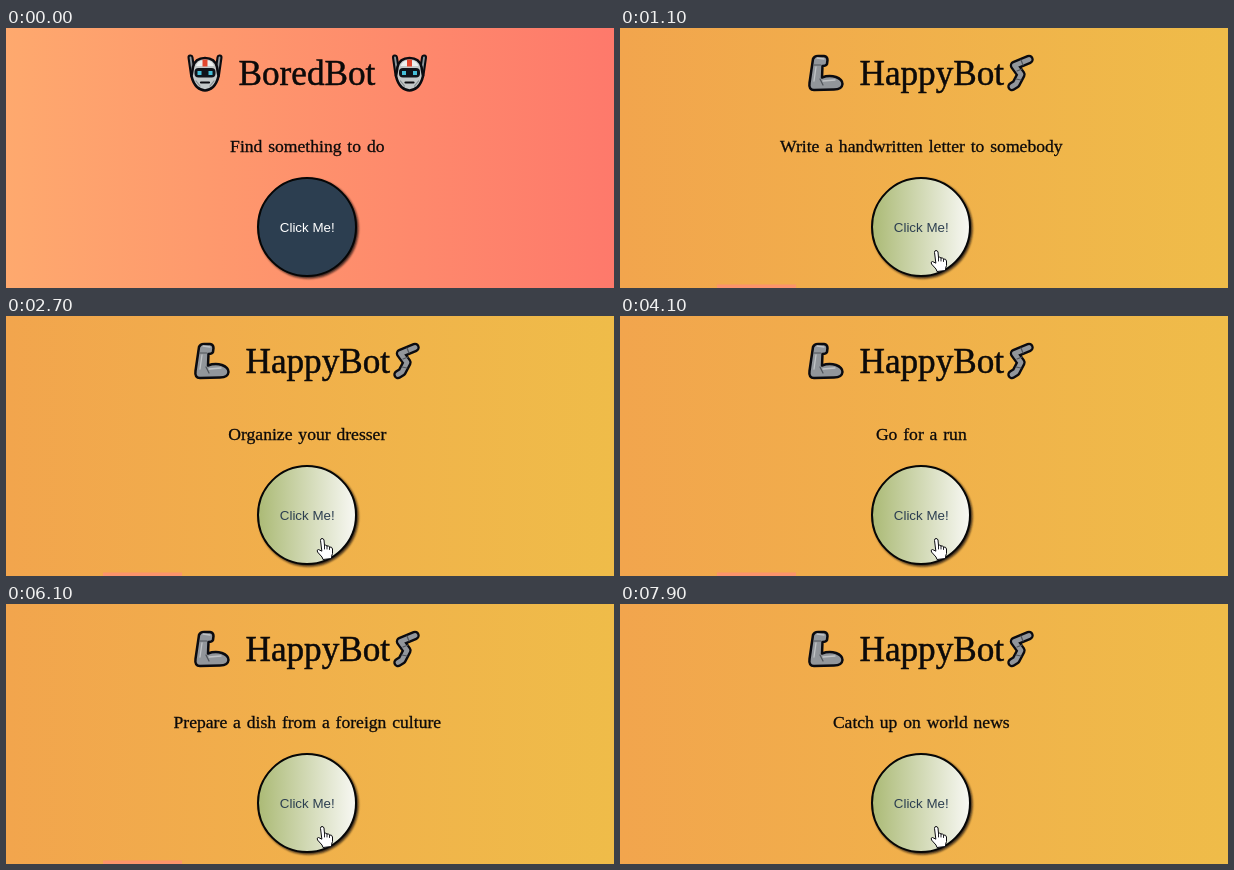
Recreate the animation shown at these times as an HTML page. Size 608 by 260 pixels, loop 8000 ms.

```html
<!DOCTYPE html>
<html lang="en">
<head>
<meta charset="utf-8">
<title>Bot</title>
<style>
  html, body { margin: 0; width: 100%; height: 100%; overflow: hidden; }
  svg { display: block; width: 608px; height: 260px; }
  .title, .idea { font-family: "Liberation Serif", "Times New Roman", serif; fill: #0c0a0a; stroke: #0c0a0a; }
  .title { font-size: 35.2px; stroke-width: .5px; }
  .idea { font-size: 17.6px; word-spacing: 1.45px; stroke-width: .3px; text-anchor: middle; }
  .label { font: 13.333px "Liberation Sans", Arial, sans-serif; text-anchor: middle; }
  .ink { stroke: #0b0b10; stroke-linejoin: round; stroke-linecap: round; }
  .happy .bored-only, svg:not(.happy) .happy-only { display: none; }
</style>
</head>
<body>
<svg id="stage" viewBox="0 0 608 260">
  <defs>
    <linearGradient id="coral">
      <stop offset="0" stop-color="#fea96e"/><stop offset="1" stop-color="#fe796b"/>
    </linearGradient>
    <linearGradient id="amber">
      <stop offset="0" stop-color="#f2a54d"/><stop offset="1" stop-color="#efbc49"/>
    </linearGradient>
    <linearGradient id="sage">
      <stop offset="0" stop-color="#abba75"/><stop offset="1" stop-color="#f8f8f4"/>
    </linearGradient>
    <filter id="soft" x="-10%" y="-10%" width="120%" height="120%">
      <feGaussianBlur stdDeviation="0.8"/>
    </filter>
    <g id="robot" class="ink">
      <path d="M184.500 29.500L187 47M213.500 29.500L211 47" stroke-width="6"/>
      <path d="M184.500 29.500L187 47M213.500 29.500L211 47" stroke="#8f979c" stroke-width="1.800"/>
      <path d="M187 39Q189 30 199 30Q209 30 211 39L212.500 48Q211 55 207 59Q203 62.500 199 62.500Q195 62.500 191 59Q187 55 185.500 48Z" fill="#c3c8c8" stroke-width="2.600"/>
      <path d="M190 38Q192 32 199 32Q206 32 208 38Z" fill="#ecefee" stroke="none"/>
      <path d="M196.500 31.500H201.500V38.500H196.500Z" fill="#e2472f" stroke="none"/>
      <rect x="188.500" y="40" width="21" height="9.500" rx="4" stroke="none" fill="#10141a"/>
      <path d="M191.500 43H195.500V47H191.500ZM202.500 43H206.500V47H202.500Z" fill="#45bfd8" stroke="none"/>
      <path d="M195 54.500H203" stroke-width="2.200"/>
      <path d="M190 53L194 58M208 53L204 58" stroke="#858d90" stroke-width="1.200"/>
    </g>
  </defs>

  <g class="bored-only">
    <rect width="608" height="260" fill="url(#coral)"/>
    <use href="#robot"/>
    <use href="#robot" x="204.500"/>
    <text class="title" x="232.500" y="57">BoredBot</text>
  </g>

  <g class="happy-only">
    <rect width="608" height="260" fill="url(#amber)"/>
    <rect id="strip" x="97" y="256.500" width="79" height="3.500" fill="#fc946b"/>
    <g class="ink">
      <path d="M193 31Q194 28 198 28L204 28Q207.500 28.500 207.500 32L207 36Q206 38 202.500 38L202 49.500Q209 47 216 49Q222.500 51.500 222.500 56Q222 61.500 214 61.500L194 62Q188.500 62 189.500 55Z" fill="#92969b" stroke-width="2.500"/>
      <path d="M197 30L204 31M196 39L194 53M203 53L215 52" fill="none" stroke="#c0c3c6" stroke-width="1.300"/>
      <path d="M194 37H201M200 51L203 57" fill="none" stroke="#50545a" stroke-width="1.200"/>
      <path d="M409 31.500L394.500 37.500L401 46.500L396 56L392 58.500" fill="none" stroke-width="9.500"/>
      <path d="M409 31.500L394.500 37.500L401 46.500L396 56L392 58.500" fill="none" stroke="#92969b" stroke-width="4.800"/>
      <path d="M401 32L403 37M397 43L402 41M396 51L401 52" stroke="#50545a" stroke-width="1.200"/>
    </g>
    <text class="title" x="239.500" y="57">HappyBot</text>
  </g>

  <text id="idea" class="idea" x="301.300" y="124"></text>

  <circle cx="302.500" cy="200.500" r="50" fill="#141010" opacity=".85" filter="url(#soft)"/>
  <g stroke="#060606" stroke-width="2">
    <circle class="bored-only" cx="301" cy="199" r="49" fill="#2c3e50"/>
    <circle class="happy-only" cx="301" cy="199" r="49" fill="url(#sage)"/>
  </g>
  <text class="label bored-only" x="301.200" y="203.700" fill="#fff">Click Me!</text>
  <text class="label happy-only" x="301.200" y="203.700" fill="#2c3e50">Click Me!</text>

  <g id="pointer" class="ink" fill="#fff" stroke-width="1">
    <path id="arrow" d="M.5 .5V16L4 12.500L6.500 18.500L9 17.500L6.500 11.500H11.500Z"/>
    <g id="hand">
      <path d="M4.500 2Q4.500 .5 6 .5Q7.500 .5 8 2L8.500 7.500Q9.500 6.500 11 8Q12.500 7.500 13.500 9Q16 8.500 16.500 11V15.500L15.500 18.500V20.500L7 21.500L6 19L1.500 14Q.500 11.500 2.500 11.500L5.500 13Z"/>
      <path d="M8.500 7.500V11M11 8V11M13.500 9V11.500" fill="none" stroke-width=".9"/>
    </g>
  </g>
</svg>

<script>
  const LOOP = 8000, SWITCH = 1100, CLEAN = 7300;
  const ideas = [
    [0, "Find something to do"],
    [SWITCH, "Write a handwritten letter to somebody"],
    [1900, "Watch a movie you'd never usually watch"],
    [2700, "Organize your dresser"],
    [3300, "Learn Morse code"],
    [4100, "Go for a run"],
    [4800, "Clean out your refrigerator"],
    [5400, "Go to a karaoke bar with some friends"],
    [6000, "Prepare a dish from a foreign culture"],
    [6700, "Write a list of things you are grateful for"],
    [CLEAN, "Catch up on world news"]
  ];
  // start, shape, x, y
  const moves = [
    [0, ""],
    [100, "arrow", 251, 117],
    [200, "hand", 329, 234],
    [300, "hand", 310, 226],
    [800, "hand", 310, 222]
  ];

  const $ = id => document.getElementById(id);
  const at = (list, t) => list.findLast(step => step[0] <= t);
  const show = (id, on) => { $(id).style.display = on ? "" : "none"; };

  function draw(t) {
    const idea = at(ideas, t)[1];
    if ($("idea").textContent !== idea) $("idea").textContent = idea;
    $("stage").classList.toggle("happy", t >= SWITCH);
    show("strip", t < CLEAN);

    const [, shape, x = 0, y = 0] = at(moves, t);
    show("arrow", shape === "arrow");
    show("hand", shape === "hand");
    $("pointer").setAttribute("transform", `translate(${x} ${y})`);
  }

  const start = performance.now();
  function tick() {
    draw((performance.now() - start) % LOOP);
    requestAnimationFrame(tick);
  }
  tick();
</script>
</body>
</html>
```
